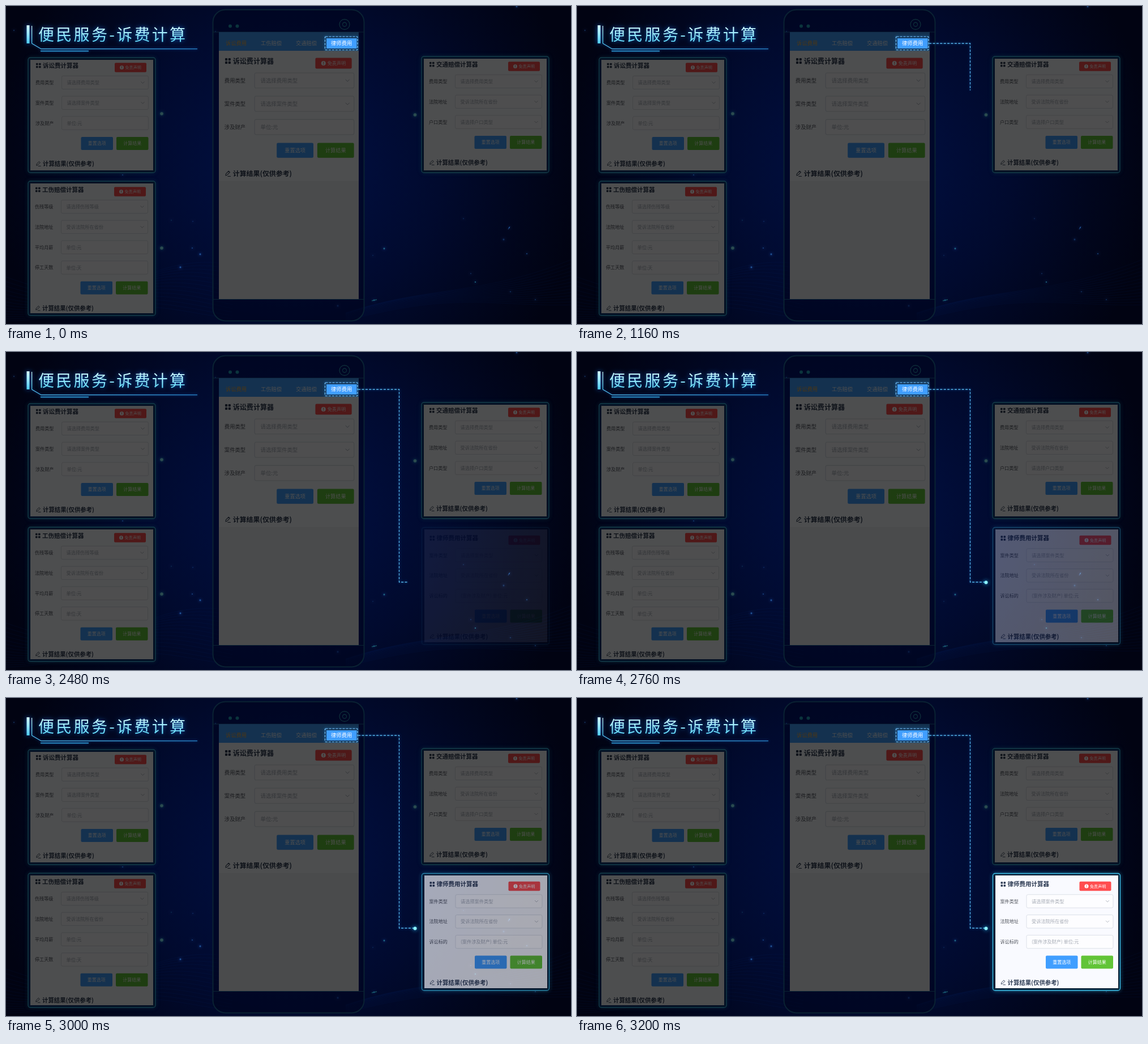
Recreate the animation shown at these times as an HTML page with a canvas. Size 998 by 561 pixels, loop 4000 ms.

```html
<!DOCTYPE html>
<html lang="zh-CN">
<head>
<meta charset="utf-8">
<style>
html, body { margin: 0; width: 100%; height: 100%; overflow: hidden; background: #010312; }
canvas { display: block; }
</style>
</head>
<body>
<canvas id="stage" width="998" height="561"></canvas>
<script>
const W = 998, H = 561, LOOP = 4000, STEP = 40;
const FONT = '"Noto Sans CJK SC", "Noto Sans CJK", sans-serif';
const stage = document.getElementById('stage').getContext('2d');
let g = stage;

const LIT = { bg: '#f9faff', title: '#2c3a52', label: '#50545c', hint: '#a6abb5', line: '#d9dde6',
  field: '#fdfdff', blue: '#409eff', green: '#62c437', red: '#ff4d4f', caption: '#ffffff', edge: '#3cc4ee' };

// The same colour seen through the dark veil
function dim(hex) {
  const part = i => Math.round(parseInt(hex.slice(i, i + 2), 16) * 0.31);
  return `rgb(${part(1)},${part(3)},${part(5)})`;
}
const DIM = Object.fromEntries(Object.entries(LIT).map(([key, hex]) => [key, dim(hex)]));

function layer(draw) {
  const c = document.createElement('canvas');
  c.width = W;
  c.height = H;
  g = c.getContext('2d');
  draw();
  g = stage;
  return c;
}

function box(x, y, w, h, r, fill, stroke, width = 1) {
  g.beginPath();
  g.roundRect(x, y, w, h, r);
  if (fill) { g.fillStyle = fill; g.fill(); }
  if (stroke) { g.strokeStyle = stroke; g.lineWidth = width; g.stroke(); }
}

function line(points, color, width = 1) {
  g.beginPath();
  points.forEach(([x, y]) => g.lineTo(x, y));
  g.strokeStyle = color;
  g.lineWidth = width;
  g.stroke();
}

function disc(x, y, r, fill) {
  g.beginPath();
  g.arc(x, y, r, 0, 7);
  g.fillStyle = fill;
  g.fill();
}

function ring(x, y, r, color, width = 1) {
  g.beginPath();
  g.arc(x, y, r, 0, 7);
  g.strokeStyle = color;
  g.lineWidth = width;
  g.stroke();
}

// y is the vertical centre of the glyphs
function text(s, x, y, size, color, align = 'left', weight = 400) {
  g.font = `${weight} ${size}px ${FONT}`;
  g.textAlign = align;
  g.fillStyle = color;
  g.fillText(s, x, y + size * 0.38);
}

function glow(color, blur, draw) {
  g.save();
  g.shadowColor = color;
  g.shadowBlur = blur;
  draw();
  g.restore();
}

function button(s, x, y, w, h, fill, c) {
  box(x, y - h / 2, w, h, 2, fill);
  text(s, x + w / 2, y, 8, c.caption, 'center');
}

// Calculator form; origin is the left edge of the title icon at its centre
function form(x, y, scale, c, title, rows) {
  g.save();
  g.translate(x, y);
  g.scale(scale, scale);
  for (const i of [0, 5]) for (const j of [-4.3, 0.7]) box(i, j, 3.6, 3.6, 0.8, c.title);
  text(title, 12, 0, 10.5, c.title, 'left', 700);

  box(139, -4.7, 56, 16.5, 2, c.red);
  disc(151.5, 3.5, 3.5, c.caption);
  box(151, 1.3, 1, 2.7, 0, c.red);
  box(151, 4.6, 1, 1, 0, c.red);
  text('免责声明', 157.5, 3.5, 7.1, c.caption);

  rows.forEach(([label, hint], i) => {
    const cy = 30 + 35.8 * i;
    text(label, -1, cy, 8.1, c.label);
    box(45.5, cy - 11.7, 153, 23.4, 2.5, c.field, c.line, 0.9);
    text(hint, 54.5, cy, 8.2, c.hint);
    if (!hint.includes('单位')) line([[185.5, cy - 1.5], [188.5, cy + 1.5], [191.5, cy - 1.5]], c.hint, 0.8);
  });

  const by = 30 + 35.8 * rows.length;
  button('重置选项', 79.5, by, 56.5, 23, c.blue, c);
  button('计算结果', 142, by, 56.5, 23, c.green, c);

  const ry = by + 36;
  line([[0.8, ry + 3], [1.3, ry], [5.4, ry - 4], [7.3, ry - 2.2], [3.2, ry + 2], [0.8, ry + 3]], c.title, 0.9);
  line([[3.8, ry + 4], [8.6, ry + 4]], c.title, 0.9);
  text('计算结果(仅供参考)', 12, ry, 10.4, c.title, 'left', 700);
  g.restore();
}

function panel(x, y, h, c, origin, title, rows) {
  box(x, y, 225, h, 4, '#010a1e');
  glow(c.edge, 6, () => box(x, y, 225, h, 4, null, c.edge, 1.3));
  box(Math.round(x + 4), Math.floor(y + 4), 217, Math.round(h - 8), 0, c.bg);
  form(...origin, 1, c, title, rows);
}

const pick = s => [s, '请选择' + s];
const court = ['法院地址', '受诉法院所在省份'];
const feeRows = [pick('费用类型'), pick('案件类型'), ['涉及财产', '单位:元']];

function backdrop() {
  g.fillStyle = '#010312';
  g.fillRect(0, 0, W, H);
  const sky = g.createRadialGradient(500, 280, 60, 500, 280, 520);
  sky.addColorStop(0, '#010f40');
  sky.addColorStop(0.45, '#010a2e');
  sky.addColorStop(0.75, '#01061e');
  sky.addColorStop(1, '#010312');
  g.fillStyle = sky;
  g.fillRect(0, 0, W, H);

  for (let k = 0; k < 14; k++) {
    const left = [], right = [];
    for (let x = 0; x <= 400; x += 10) {
      left.push([x, 478 + k * 5 + Math.sin(x / 75 + k * 0.13) * (26 - k)]);
      right.push([600 + x, 555 - x * (0.1 + k * 0.015) - Math.sin(x / 95 + k * 0.1) * 14]);
    }
    line(left, 'rgba(22,70,165,0.1)', 0.7);
    line(right, 'rgba(22,70,165,0.1)', 0.7);
  }

  const sparks = [[292, 378], [329, 427], [308, 461], [808, 375], [889, 391], [879, 412], [821, 472],
    [829, 487], [586, 529], [891, 504], [935, 518], [902, 1], [14, 43], [206, 298],
    [668, 428], [648, 440], [920, 437], [343, 438], [330, 380], [370, 45], [650, 519]];
  sparks.forEach(([x, y], i) => glow('#1f6cff', 4, () => {
    g.globalAlpha = 0.4 + 0.4 * (i * 7 % 5) / 4;
    disc(x, y, 0.8 + 0.3 * (i % 3), i % 7 ? '#2a66a8' : '#2b8a99');
  }));
  line([[887, 394], [890, 389]], 'rgba(50,110,190,0.5)', 1.3);
  line([[646, 520], [655, 518]], 'rgba(40,150,140,0.5)', 1.3);
}

function heading() {
  const shine = g.createLinearGradient(0, 36, 0, 66);
  shine.addColorStop(0, '#d2fbff');
  shine.addColorStop(0.4, '#a4f0ff');
  shine.addColorStop(1, '#4fd0f5');
  glow('#0a62c8', 8, () => {
    g.letterSpacing = '3.3px';
    text('便民服务-诉费计算', 57, 50, 28, shine, 'left', 500);
    g.letterSpacing = '0px';
    box(36.5, 34, 5, 32, 0, shine);
    box(45, 35, 1.2, 31, 0, shine);
  });
  const fade = g.createLinearGradient(45, 0, 338, 0);
  fade.addColorStop(0, '#58c8f4');
  fade.addColorStop(1, '#2a86c8');
  glow('#0a50b0', 4, () => {
    line([[45.5, 66], [62, 75.7], [338, 75.7]], fade, 1.2);
    line([[61, 79.5], [146, 79.5]], '#35a8e0', 1.6);
  });
}

function phone() {
  const edge = '#0a2233';
  box(365.5, 6.5, 267, 549, 22, 'rgba(1,5,28,0.55)', edge, 2);
  line([[366, 46], [632, 46]], edge);
  line([[366, 517.5], [632, 517.5]], edge);
  disc(396, 35.5, 3, '#0b343c');
  disc(408.5, 35.5, 3, '#0b343c');
  ring(598, 32.5, 9, '#0e2e3a', 1.3);
  ring(598, 32.5, 3.5, '#0e2e3a', 1.3);

  box(376, 46, 247, 471, 0, '#4a4b4c');
  box(376, 79, 247, 230, 0, DIM.bg);
  box(376, 46, 247, 33, 0, DIM.blue);
  text('诉讼费用', 406.5, 65.5, 9.3, dim('#ffb03b'), 'center');
  text('工伤赔偿', 468.5, 65.5, 9.3, DIM.caption, 'center');
  text('交通赔偿', 530.5, 65.5, 9.3, DIM.caption, 'center');
  form(387, 97, 1.147, DIM, '诉讼费计算器', feeRows);

  glow('#2b9dff', 4, () => {
    g.setLineDash([4, 2]);
    box(563.5, 54, 57.5, 23.5, 1, null, '#7cc8ff', 1.2);
    g.setLineDash([]);
  });
  box(566, 57, 53.5, 18, 0, '#409eff');
  text('律师费用', 592.7, 65.7, 9.3, '#ffffff', 'center', 500);
}

const scene = layer(() => {
  backdrop();
  heading();
  phone();
  panel(39, 91, 203, DIM, [53, 105], '诉讼费计算器', feeRows);
  panel(39, 309, 237, DIM, [52, 324], '工伤赔偿计算器',
    [pick('伤残等级'), court, ['平均月薪', '单位:元'], ['停工天数', '单位:天']]);
  panel(734, 89, 205, DIM, [748, 103], '交通赔偿计算器',
    [pick('费用类型'), court, pick('户口类型')]);
  for (const [x, y] of [[275, 190], [275, 427], [722.5, 192]]) {
    glow('#0f4a55', 5, () => disc(x, y, 2.8, dim('#8cf2ff')));
  }
});

const result = layer(() => panel(734.5, 309.5, 206.5, LIT, [748.5, 328.5], '律师费用计算器',
  [pick('案件类型'), court, ['诉讼标的', '(案件涉及财产) 单位:元']]));

const ramp = (t, from, to) => Math.min(1, Math.max(0, (t - from) / (to - from)));

function connector(t) {
  const a = ramp(t, 0, 780), b = ramp(t, 800, 2280), c = ramp(t, 2300, 2620);
  if (!a) return;
  const path = [[622, 66], [622 + 72.5 * a, 66]];
  if (b) path.push([694.5, 66 + 340 * b]);
  if (c) path.push([694.5 + 27 * c, 406]);
  glow('#0f5cb0', 4, () => {
    g.setLineDash([4.2, 2.2]);
    line(path, '#55b2e8', 1.3);
  });
}

function frame(now) {
  const t = Math.floor(now % LOOP / STEP) * STEP;
  g.globalAlpha = 1;
  g.drawImage(scene, 0, 0);
  connector(t);
  g.globalAlpha = ramp(t, 2320, 3200) ** 1.6;
  g.drawImage(result, 0, 0);
  g.globalAlpha = ramp(t, 2600, 2720);
  glow('#2bc8ff', 7, () => disc(722.5, 406.5, 3, '#8cf2ff'));
  requestAnimationFrame(frame);
}
requestAnimationFrame(frame);
</script>
</body>
</html>
```
